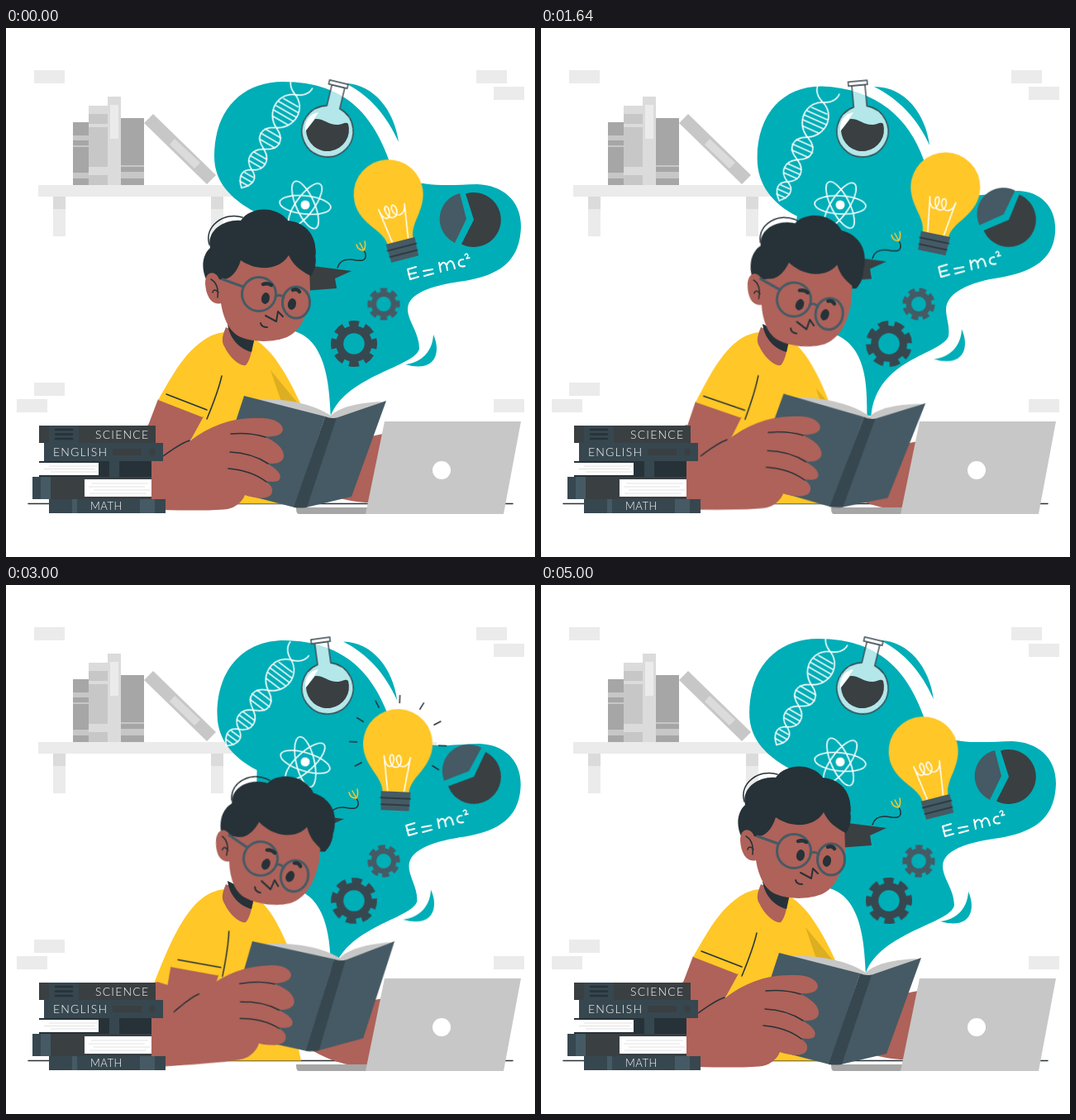
An HTML page without scripts for the animation above (5070 ms loop, 640 by 640 pixels).

```html
<!DOCTYPE html>
<html lang="en">
<head>
<meta charset="utf-8">
<title>Studying</title>
<style>
html, body { margin: 0; height: 100%; overflow: hidden; background: #fff; }
svg { display: block; width: 100%; height: 100%; }
.line { fill: none; stroke: #263238; stroke-width: 1.5; stroke-linecap: round; stroke-linejoin: round; }
.white { fill: none; stroke: #fff; stroke-width: 1.6; stroke-linecap: round; stroke-linejoin: round; }
.teal { fill: #00aeb7; }
.skin { fill: #ae6259; }
.ink { fill: #263238; }
.yellow { fill: #ffc727; }
.slate { fill: #455a64; }
.deep { fill: #37474f; }
.coal { fill: #3a3f42; }
.pale { fill: #ebebeb; }
.light { fill: #dbdbdb; }
.mid { fill: #c7c7c7; }
.grey { fill: #a6a6a6; }
.title { fill: #fff; font: 300 14px Lato, "Open Sans", sans-serif; letter-spacing: 1.2px; }

/* full-loop motions */
.hair, .skull, .face, .cap, .book, .arm, .forearm, .sleeve, .fold, .palm, .dna, .bulb, .flask, .pie, .page, .cog, .back, .atom {
  animation: 5.07s linear infinite;
}
.hair { animation-name: hair; transform-origin: 275px 365px; }
@keyframes hair {
  0%, 82%, 100% { transform: none; }
  12.6% { transform: translate(2px, 1px) rotate(4.5deg); }
  23.9% { transform: translate(3px, 1px) rotate(8.3deg); }
  40.8% { transform: translate(4px, 0) rotate(9deg); }
  59.2% { transform: translate(5px, 2px) rotate(12deg); }
  73.2% { transform: rotate(1.3deg); }
}
.skull { animation-name: skull; transform-origin: 275px 365px; }
@keyframes skull {
  0%, 82%, 100% { transform: none; }
  12.6% { transform: translate(2px, 2px) rotate(2.8deg); }
  23.9% { transform: translate(4px, 3px) rotate(4.8deg); }
  40.8% { transform: translate(4px, 3px) rotate(5deg); }
  59.2% { transform: translate(6px, 3px) rotate(7deg); }
  73.2% { transform: translate(1px, .5px) rotate(.8deg); }
}
.face { animation-name: face; transform-origin: 306px 322px; }
@keyframes face {
  0%, 82%, 100% { transform: none; }
  12.6% { transform: translate(0, 4px) rotate(4.9deg); }
  23.9% { transform: translate(0, 6px) rotate(9.5deg); }
  40.8% { transform: translate(0, 7px) rotate(9.6deg); }
  59.2% { transform: translate(2px, 9px) rotate(14.5deg); }
  73.2% { transform: translate(1px, 1px) rotate(2deg); }
}
.cap { animation-name: cap; }
@keyframes cap {
  0%, 98.6%, 100% { transform: none; }
  12.6% { transform: translate(1.5px, -4px); }
  23.9% { transform: translate(2px, -9px); }
  40.8% { transform: translate(-2px, -14px); }
  59.2% { transform: translate(-9px, -11px); }
  73.2% { transform: translate(-7px, -7px); }
}
.book { animation-name: book; transform-origin: 288px 445px; }
@keyframes book {
  0%, 23.9%, 82%, 100% { transform: none; }
  12.6% { transform: translate(10px, -3px) rotate(-.7deg); }
  40.8% { transform: translate(11px, -5px) rotate(3.6deg); }
  59.2% { transform: translate(10px, -14px) rotate(-2deg); }
  73.2% { transform: translate(4px, -2px) rotate(1.3deg); }
}
.page { animation-name: page; transform-origin: 393px 470px; }
@keyframes page {
  0%, 8% { transform: skewX(-50deg) scaleY(0); }
  12.6% { transform: none; }
  17%, 100% { transform: skewX(50deg) scaleY(0); }
}
.arm { animation-name: arm; transform-origin: 255px 375px; }
@keyframes arm {
  0%, 23.9%, 82%, 100% { transform: none; }
  12.6% { transform: rotate(-7deg); }
  40.8% { transform: rotate(-4.5deg); }
  59.2% { transform: rotate(-11deg); }
  73.2% { transform: rotate(-1.5deg); }
}
.forearm { animation-name: forearm; transform-origin: 170px 560px; }
@keyframes forearm {
  0%, 23.9%, 82%, 100% { transform: none; }
  12.6% { transform: translate(12px, 0) rotate(-1.1deg); }
  40.8% { transform: translate(8px, 0) rotate(-1.8deg); }
  59.2% { transform: translate(17px, 0) rotate(-5deg); }
  73.2% { transform: translate(4px, 0) rotate(-.4deg); }
}
.sleeve { animation-name: sleeve; transform-origin: 301px 377px; }
@keyframes sleeve {
  0%, 82%, 100% { transform: none; }
  12.6%, 40.8% { transform: rotate(4deg); }
  59.2% { transform: rotate(5deg); }
  73.2% { transform: rotate(2deg); }
}
.fold { animation-name: fold; transform-origin: 345px 457px; }
@keyframes fold {
  0%, 82%, 100% { transform: none; }
  12.6%, 23.9%, 73.2% { transform: scale(.6); }
  40.8% { transform: scale(.4); }
  59.2% { transform: scale(0); }
}
.palm { animation-name: palm; }
@keyframes palm {
  0%, 73.2%, 100% { transform: translate(0, -9px); }
  12.6%, 59.2% { transform: none; }
}
.dna { animation-name: dna; }
@keyframes dna {
  0%, 98.6%, 100% { transform: translate(321px, 131px) rotate(30deg); }
  12.6% { transform: translate(322px, 137px) rotate(26deg); }
  23.9% { transform: translate(317px, 143px) rotate(19deg); }
  40.8% { transform: translate(318px, 143px) rotate(29deg); }
  59.2% { transform: translate(310px, 137px) rotate(37deg); }
  73.2% { transform: translate(317px, 136px) rotate(38deg); }
}
.bulb { animation-name: bulb; }
@keyframes bulb {
  0%, 98.6%, 100% { transform: translate(480px, 269px) rotate(-14.4deg); }
  12.6% { transform: translate(478px, 263px) rotate(-6deg); }
  23.9% { transform: translate(476px, 261px) rotate(7.4deg); animation-timing-function: ease-out; }
  34% { transform: translate(475px, 261px) rotate(12deg); animation-timing-function: ease-in; }
  40.8% { transform: translate(474px, 261px) rotate(10deg); }
  59.2% { transform: translate(471px, 262px) rotate(2.5deg); }
  73.2% { transform: translate(473px, 263px) rotate(-5.7deg); }
}
.flask { animation-name: flask; transform-origin: 389px 125px; animation-timing-function: cubic-bezier(.37, 0, .63, 1); }
@keyframes flask {
  0%, 95%, 100% { transform: rotate(13.5deg); }
  48% { transform: rotate(-11deg); }
}
.pie { animation-name: pie; transform-origin: 566px 232px; }
@keyframes pie {
  0% { transform: none; animation-timing-function: cubic-bezier(.39, .575, .565, 1); }
  49% { transform: rotate(45deg); animation-timing-function: cubic-bezier(.47, 0, .745, .715); }
  98.6%, 100% { transform: none; }
}
.cog { animation-name: cog; }
.back { animation-name: cog; animation-direction: reverse; }
@keyframes cog { to { transform: rotate(90deg); } }
.atom { animation-name: atom; }
@keyframes atom {
  0%, 98.6%, 100% { transform: rotate(6deg); }
  23.9%, 73.2% { transform: rotate(-8deg); }
  40.8% { transform: rotate(14deg); }
  59.2% { transform: rotate(17deg); }
}

/* breathing cloud: two swings per loop */
.cloud, .gleam, .drop, .formula { animation: 1.2675s cubic-bezier(.37, 0, .63, 1) infinite alternate; }
.cloud { animation-name: cloud; }
@keyframes cloud {
  from { d: path("M252 155C252 100 285 65 335 65C415 65 447 110 467 170C475 185 490 188 505 188C520 191 545 190 570 189C600 190 623 208 623 240C622 284 595 299 555 306C525 310 486 318 486 340C486 355 500 368 500 388C495 410 412 420 393 469L393 469C391 440 390 375 345 366L300 350L300 222C270 205 252 185 252 155Z"); }
  to { d: path("M264 158C264 105 295 72 340 72C405 75 445 110 462 157C480 195 500 206 525 206C545 206 555 199 580 199C605 200 622 218 622 243C622 279 595 294 555 301C525 305 492 318 491 340C491 350 494 360 491 370C480 392 405 395 401 469L395 469C395 430 396 385 352 369L305 350L312 229C282 214 264 190 264 158Z"); }
}
.gleam { animation-name: gleam; }
@keyframes gleam {
  from { d: path("M411 67C445 68 470 100 475 138C460 105 440 82 411 67Z"); }
  to { d: path("M401 72C440 72 464 105 469 143C455 112 433 88 401 72Z"); }
}
.drop { animation-name: drop; }
@keyframes drop { to { transform: translate(-10px, -8px); } }
.formula { animation-name: formula; }
@keyframes formula { to { transform: translate(-6px, -3.5px); } }
.rays { stroke-dasharray: 10 20; stroke-linecap: butt; animation: rays 2.535s linear infinite; }
@keyframes rays {
  0%, 9% { stroke-dashoffset: 10; }
  17%, 19% { stroke-dashoffset: 0; }
  26%, 100% { stroke-dashoffset: -10; }
}
</style>
</head>
<body>
<svg viewBox="0 0 640 640">
<defs>
  <path id="brick" class="pale" d="M0 0h37v16H0z"/>
  <g id="gear" fill="none">
    <circle r="17.3" stroke-width="9"/>
    <circle r="24.5" stroke-width="7" pathLength="16" stroke-dasharray="1.25 .75" stroke-dashoffset=".625" transform="rotate(-90)"/>
  </g>
  <path id="strand" d="M-14-75C-14-68-10-62 0-58C20-50 20-22 0-12C-17-4-17 10 0 18C14 26 14 40 0 47C-11 52-11 62 0 72"/>
  <ellipse id="orbit" rx="31" ry="11"/>
  <path id="ray" d="M0-49V-59"/>
</defs>

<!-- wall and shelf -->
<use href="#brick" x="34" y="51"/><use href="#brick" x="569" y="51"/><use href="#brick" x="590" y="71"/>
<use href="#brick" x="34" y="429"/><use href="#brick" x="13" y="449"/><use href="#brick" x="590" y="449"/>
<path class="pale" d="M39 190H521V204H39zM57 204h15v48H57zM248 204h15v48h-15z"/>
<path class="light" d="M57 204h15v15H57zM248 204h15v15h-15z"/>
<path class="grey" d="M81 114h19v76H81zM139 109h28v81h-28z"/>
<path class="mid" d="M81 130h19v6H81zM81 142h19v2H81zM81 175h19v7H81zM139 166h28v2h-28zM139 174h28v8h-28z"/>
<path class="light" d="M100 94h23v96h-23zM123 83h16v107h-16z"/>
<path class="mid" d="M100 104h23v12h-23zM100 120h23v48h-23zM100 178h23v12h-23zM167 115L178 104L254 178L243 189z"/>
<path class="pale" d="M126 93h10v41h-10z"/>
<path class="light" d="M198 141L204 134L235 163L228 170z"/>

<!-- thought cloud -->
<path class="cloud teal"/>
<path class="gleam teal"/>
<path class="drop teal" d="M517 371C526 390 522 418 483 407C502 405 516 392 517 371z"/>

<g class="dna white">
  <use href="#strand"/><use href="#strand" transform="scale(-1 1)"/>
  <path d="M-10-47H10M-14-41H14M-15-35H15M-14-29H14M-11-22H11M-11-4H11M-13 3H13M-11 10H11M-9 27H9M-10 33H10M-9 39H9M-6 54H6M-8 60H8M-6 66H6"/>
</g>

<g transform="translate(362 214)"><g class="atom white">
  <use href="#orbit"/><use href="#orbit" transform="rotate(60)"/><use href="#orbit" transform="rotate(120)"/>
  <circle r="5.5" fill="#fff" stroke="none"/>
</g></g>

<g class="flask">
  <path d="M381 69V95A31 31 0 1 0 397 95V69z" fill="#fff" fill-opacity=".7" stroke="#37474f" stroke-width="1.4"/>
  <path d="M377 64H400V69H377z" fill="#fff" stroke="#37474f" stroke-width="1.4"/>
</g>
<path d="M362 125C361 112 367 104 378 102L366 120z" fill="#fff"/>
<path class="coal" d="M363 124L374 110C384 109 391 118 402 117C408 116 411 113 414 116A26 26 0 1 1 363 124z"/>

<g class="pie">
  <path class="coal" d="M566 232L556 200.5A33 33 0 1 1 551 261.5z"/>
  <path class="slate" d="M557 231L549 200A32 32 0 0 0 543 260z"/>
</g>

<g transform="translate(421 382)"><use href="#gear" class="cog" stroke="#37474f"/></g>
<g transform="translate(457 334) scale(.7)"><use href="#gear" class="back" stroke="#455a64"/></g>

<g class="formula white" style="stroke-width:2" role="img" aria-label="E = mc²">
  <path d="M496 289L486 292L489 304L499 301M487 298L496 296M505 294L516 292M506 300L517 297"/>
  <path d="M526 295L524 284M525 288C529 281 533 283 534 293M533 287C537 279 541 281 543 291M553 280C546 279 545 291 555 288"/>
  <path stroke-width="1.4" d="M555 275C557 271 561 274 557 279L561 278"/>
</g>

<g class="bulb">
  <path class="yellow" d="M-16-11C-16-30-42-42-42-70A42 42 0 0 1 42-70C42-42 16-30 16-11z"/>
  <path class="white" d="M-10-13L-16-55C-14-40-5-38-4-50C-4-60-11-58-8-48C-5-38 5-40 5-50C4-60-3-56 0-48C3-40 14-40 16-54L10-13"/>
  <path class="slate" d="M-18-12H18L17 11H-17z"/>
  <path class="line" d="M-18-4H18M-17 4H17"/>
  <g class="rays line" transform="translate(0 -70)">
    <use href="#ray" transform="rotate(-120)"/><use href="#ray" transform="rotate(-90)"/><use href="#ray" transform="rotate(-60)"/>
    <use href="#ray" transform="rotate(-30)"/><use href="#ray"/><use href="#ray" transform="rotate(30)"/>
    <use href="#ray" transform="rotate(60)"/><use href="#ray" transform="rotate(90)"/><use href="#ray" transform="rotate(120)"/>
  </g>
</g>

<g class="cap">
  <path class="coal" d="M340 284L418 294L398 303L400 315L360 318z"/>
  <path class="line" stroke-width="1.2" d="M401 290C404 279 415 279 424 281C436 283 437 276 433 269"/>
  <path class="line" style="stroke:#ffc727" d="M433 269C428 269 425 266 424 262M433 269L428 260M433 269C435 265 435 262 434 258"/>
</g>

<!-- student -->
<path class="line" d="M27 575.5H613"/>
<path class="yellow" d="M264 368C230 372 208 405 177 488L235 500V575.500H357L345 520L347 455C338 430 322 390 301 377z"/>
<path class="sleeve yellow" d="M301 377C325 390 345 430 357 456L340 465L300 420z"/>
<path class="fold" d="M320 414L354 455L333 452z" fill="#dcae22"/>
<path class="skin" d="M266 362C262 372 260 378 264 385C271 400 284 410 290 408C295 403 297 393 300 377z"/>
<path class="ink" d="M268 358C270 374 281 388 297 392L301 374z"/>

<g class="hair">
  <path class="ink" d="M243 306C235 290 238 274 247 266C242 246 263 231 284 233C296 215 328 215 341 233C363 235 377 252 374 275C376 286 373 295 368 300L300 310L262 306z"/>
  <path class="line" d="M246 262C239 240 264 222 286 229M344 237C361 240 374 250 374 274"/>
</g>
<g class="skull">
  <path class="skin" d="M284 262L266 300L258 304C254 293 241 293 241 309C242 326 250 336 260 333C263 351 270 368 284 374C301 381 325 380 340 374C357 366 366 346 368 320L367 288L342 262z"/>
  <path class="line" d="M248 304C255 308 257 317 256 326M250 320C251 316 254 316 257 320"/>
</g>
<path class="hair ink" d="M258 304C270 306 279 297 284 281C304 295 331 293 342 275C347 286 356 294 369 300C374 292 375 284 374 272L341 236H284L250 264z"/>

<g class="face">
  <g class="line" style="stroke:#455a64;stroke-width:3">
    <circle cx="306" cy="322" r="20.500"/><ellipse cx="351" cy="332" rx="16.500" ry="19"/>
    <path d="M326 325Q331 321 336 326M287 313L262 304"/>
  </g>
  <ellipse class="ink" cx="314" cy="327" rx="5" ry="7" transform="rotate(12 314 327)"/>
  <ellipse class="ink" cx="346" cy="334" rx="5" ry="7" transform="rotate(12 346 334)"/>
  <path class="line" style="stroke-width:4.500" d="M311 310Q316 308 321 311M347 317Q352 315 355 319"/>
  <path class="line" style="stroke-width:2" d="M314 348L327 355L329 343L335 349M308 357Q309 362 316 362"/>
</g>

<path class="palm skin" d="M456 500L436 504L402 556L366 560C385 573 412 583 440 583z"/>
<path class="grey" d="M351 580H521V588H354Q351 588 351 580z"/>

<g class="arm">
  <path class="skin" d="M184 449L239 470L222 501L192 560H150V520C160 505 167 490 173 478z"/>
  <path class="yellow" d="M258 370C222 379 204 416 184 450L238 471L266 415z"/>
  <path class="line" d="M194 443L243 462M243 473C250 456 257 439 261 421"/>
</g>

<g class="book">
  <path class="page light" d="M360 459L366 438Q388 436 414 446V458L398 470z"/>
  <path class="mid" d="M300 449C330 447 370 453 393 469C406 457 430 453 456 452L400 474L385 472z"/>
  <path class="slate" d="M288 445L386 470L349 580L252 555zM399 472L460 451L418 567L363 580z"/>
  <path class="deep" d="M386 470Q393 473 400 471.500L364 580Q356 581 348 580z"/>
</g>

<g class="forearm">
  <path class="skin" d="M130 582V500L173 480L222 500C246 481 275 471 303 472C322 471 335 477 335 486C334 493 324 495 312 494C326 500 337 509 336 519C334 527 324 528 314 526C328 533 334 540 331 546C329 550 320 549 312 548C321 552 324 558 321 564C316 571 300 569 289 565C286 573 278 580 268 582C240 585 200 583 130 582z"/>
  <path class="line" d="M190 518C200 511 210 503 222 499M272 491Q295 489 314 495M271 513Q297 514 317 527M269 533Q296 535 315 549"/>
</g>

<!-- laptop -->
<path class="mid" d="M458 476H623L602 588H435z"/>
<circle cx="527" cy="535" r="11" fill="#fff"/>

<!-- desk books -->
<path class="coal" d="M40 481H181V502H40z"/>
<path class="deep" d="M52 481H88V502H52zM46 502H190V524H46z"/>
<path class="line" stroke-linecap="butt" style="stroke-width:2.500" d="M60 486H80M60 491.500H80M60 497H80"/>
<path class="coal" d="M129 509H164V517H129z"/><ellipse class="coal" cx="177" cy="513" rx="4" ry="4.500"/>
<path class="ink" d="M40 524H176V543H40z"/><path class="deep" d="M125 524H137V543H125z"/>
<path d="M40 526H112V541H40zM95 546H176V567H95z" fill="#fff"/>
<path class="coal" d="M32 543H176V546H95V567H176V570H32z"/>
<path class="deep" d="M32 543H54V570H32zM52 570H193V587H52z"/>
<path class="slate" d="M42 543H54V570H42zM80 570H86V587H80zM162 570H180V587H162z"/>
<path fill="none" stroke="#dbdbdb" stroke-width=".8" d="M52 530H110M46 533.500H108M54 537H110M103 551H172M100 555H168M106 559H174M101 563H170"/>
<text class="title" x="108" y="496.500">SCIENCE</text>
<text class="title" x="57" y="518">ENGLISH</text>
<text class="title" style="font-size:13px;letter-spacing:.5px" x="102" y="583">MATH</text>
</svg>
</body>
</html>
```
